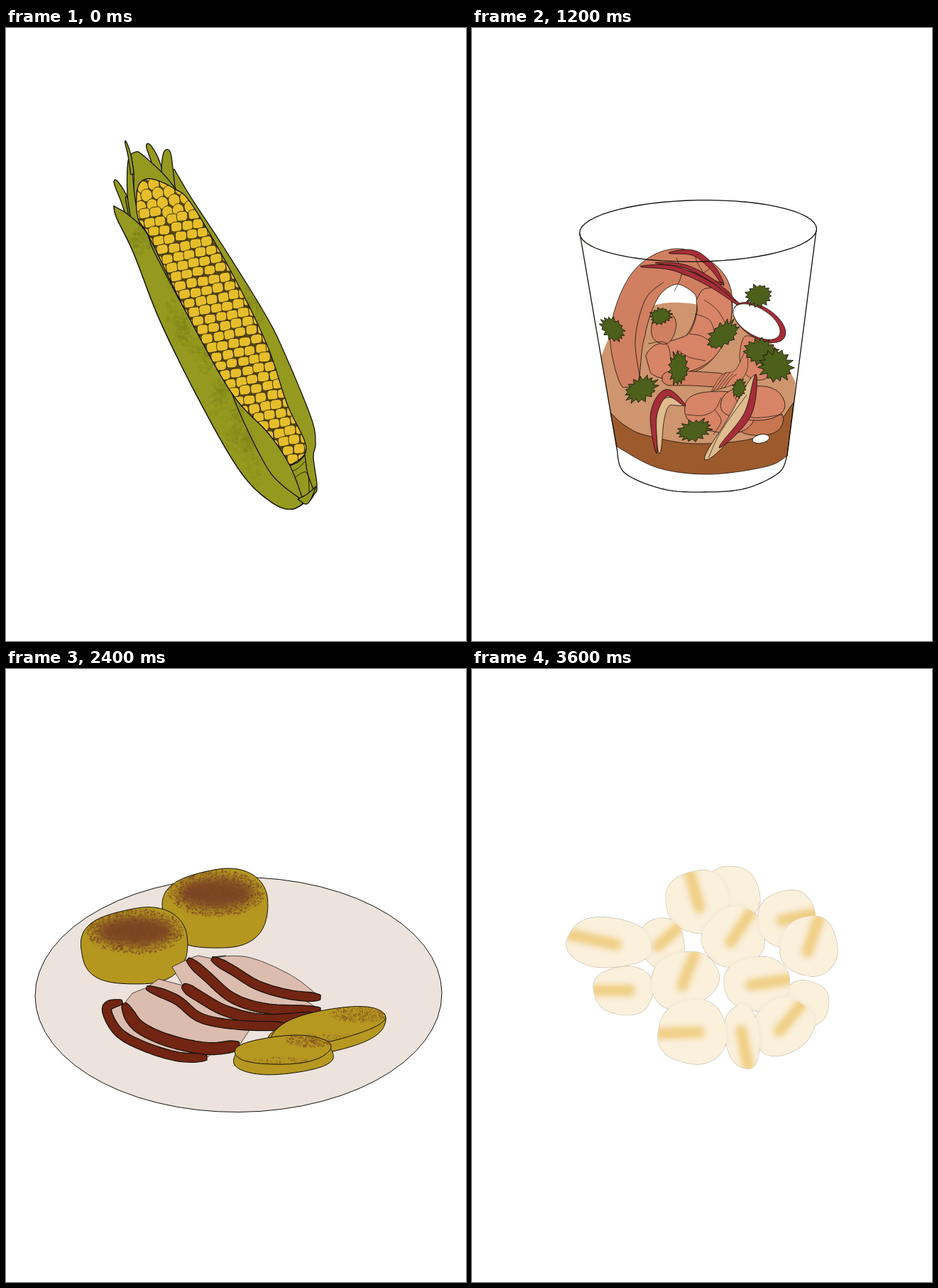
An HTML page with a canvas that plays this animation: 648 px wide and 864 px high, repeating every 4800 ms.

```html
<!DOCTYPE html>
<html lang="en">
<head>
<meta charset="utf-8">
<title>Food drawings</title>
<style>
html, body { margin: 0; width: 100%; height: 100%; overflow: hidden; background: #fff; }
canvas { display: block; width: 648px; height: 864px; }
</style>
</head>
<body>
<canvas id="stage" width="648" height="864"></canvas>
<script>
const ctx = document.getElementById('stage').getContext('2d');
const INK = '#12100a', TAU = Math.PI * 2;
let seed = 1;

function rnd() {
  seed = (seed * 16807) % 2147483647;
  return seed / 2147483647;
}

// key points "x,y"; a trailing "!" marks a sharp corner
function parse(text) {
  const pts = [];
  for (const item of text.trim().split(/\s+/)) {
    const p = item.replace('!', '').split(',').map(Number);
    pts.push(p);
    if (item.endsWith('!')) pts.push(p);
  }
  return pts;
}

// Catmull-Rom samples through the key points
function spline(text, open = true) {
  const p = parse(text), n = p.length, out = [];
  const at = i => open ? p[Math.max(0, Math.min(n - 1, i))] : p[(i + n) % n];
  const mix = (a, b, c, d, t) => 0.5 * (2 * b + (c - a) * t +
    (2 * a - 5 * b + 4 * c - d) * t * t + (3 * b - a - 3 * c + d) * t ** 3);
  for (let i = 0; i < (open ? n - 1 : n); i++) {
    const [a, b, c, d] = [at(i - 1), at(i), at(i + 1), at(i + 2)];
    if (b === c) continue;
    for (let t = 0; t < 1; t += 1 / 12) out.push([0, 1].map(k => mix(a[k], b[k], c[k], d[k], t)));
  }
  if (open) out.push(p[n - 1]);
  return out;
}

function trace(pts, open) {
  const path = new Path2D();
  pts.forEach(p => path.lineTo(...p));
  if (!open) path.closePath();
  return path;
}

function paint(path, fill, width = 1, ink = INK) {
  if (fill) { ctx.fillStyle = fill; ctx.fill(path); }
  if (width) { ctx.strokeStyle = ink; ctx.lineWidth = width; ctx.stroke(path); }
  return path;
}

const blob = (text, fill, width) => paint(trace(spline(text, false)), fill, width);
const line = (text, width = 1, ink) => paint(trace(spline(text), true), null, width, ink);

// band of varying width along a spline
function band(text, width) {
  const mid = spline(text), last = mid.length - 1, left = [], right = [];
  mid.forEach(([x, y], i) => {
    const a = mid[Math.max(0, i - 1)], b = mid[Math.min(last, i + 1)];
    const dx = b[0] - a[0], dy = b[1] - a[1], k = width(i / last) / 2 / (Math.hypot(dx, dy) || 1);
    left.push([x - dy * k, y + dx * k]);
    right.unshift([x + dy * k, y - dx * k]);
  });
  return trace(left.concat(right));
}

const taper = w => t => w * Math.sin(Math.PI * t) ** 0.6;
const stub = w => t => w * Math.sqrt(Math.min(1, 0.15 + 6 * t, 0.25 + 8 * (1 - t)));
const blade = w => t => w * Math.sqrt(1 - t) * (0.75 + 0.5 * t);

// slightly uneven rounded shape; power above 2 makes it squarer
function lump(x, y, rx, ry, turn = 0, power = 2.3, uneven = 0.025) {
  const phase = rnd() * TAU, pts = [];
  for (let a = 0; a < TAU; a += TAU / 60) {
    const c = Math.cos(a), s = Math.sin(a);
    const r = (Math.abs(c) ** power + Math.abs(s) ** power) ** (-1 / power) *
      (1 + uneven * Math.sin(3 * a + phase) + uneven * 0.5 * Math.sin(5 * a - phase));
    const u = c * r * rx, v = s * r * ry;
    pts.push([x + u * Math.cos(turn) - v * Math.sin(turn), y + u * Math.sin(turn) + v * Math.cos(turn)]);
  }
  return trace(pts);
}

const oval = (x, y, rx, ry, turn, fill, width) => paint(lump(x, y, rx, ry, turn, 2, 0), fill, width);

function inside(path, draw) {
  ctx.save();
  ctx.clip(path);
  draw();
  ctx.restore();
}

function speckle(x, y, rx, ry, color, count, size, alpha) {
  ctx.save();
  ctx.fillStyle = color;
  ctx.globalAlpha = alpha;
  for (let i = 0; i < count; i++) {
    const a = rnd() * TAU, r = rnd() ** 0.6;
    ctx.beginPath();
    ctx.arc(x + Math.cos(a) * r * rx, y + Math.sin(a) * r * ry, size * (0.4 + rnd()), 0, 7);
    ctx.fill();
  }
  ctx.restore();
}

function kernels() {
  for (let row = -1; row < 33; row++) {
    for (let col = -6; col < 10; col++) {
      const x = 207 + row * 6.3 + col * 15.6 + rnd() * 2, y = 217 + row * 12.6 - col * 3.1 + rnd() * 2;
      const w = 15 + rnd() * 1.4, h = 12.7 + rnd() * 1.4, cell = new Path2D();
      ctx.save();
      ctx.translate(x, y);
      ctx.rotate(-0.2 + rnd() * 0.2);
      if (y < 258) cell.ellipse(0, 3, 8.2, 9, 0, 0, 7);
      else cell.roundRect(-w / 2, -h / 2, w, h, [5, 4.5, 5.5, 4]);
      paint(cell, '#e6be2b', 0.9, '#39300e');
      ctx.restore();
    }
  }
}

function corn() {
  const green = '#95991f', shade = '#797e19', w = 1.3;
  const leaf = (text, width) => paint(band(text, blade(width)), green, w);
  const rim = ' 433,658 404,678 372,667 330,625 276,532 218,415 180,318 156,268';
  leaf('217,207 208,182 199,163', 15);
  const husk = blob('152,251! 185,277! 184,225 237,199! 262,241 306,308 366,405 394,462 430,550 436,585 433,605 438,645' + rim, green, w);
  inside(husk, () => speckle(350, 388, 14, 45, shade, 230, 1.8, 0.25));
  leaf('230,228 227,196 227,171', 22);
  blob('176,178! 182,175 190,177 220,204 240,228! 222,240 184,250 180,205', green, w);
  leaf('176,268 166,240 153,214', 15);
  leaf('176,268 173,252 169,238', 7);
  leaf('183,277 176,235 174,183', 14);
  leaf('178,206 174,180 168,159', 6);

  const cob = blob('184,235 190,217 207,213 238,227 262,249 318,345 367,445 396,530 423,592 400,617! 370,572 318,515 256,405 203,297 186,268', '#554512', 0);
  inside(cob, kernels);
  paint(cob, null, w);

  blob('399,617! 411,612 421,602! 425,628 433,650! 418,663', green, w);
  line('403,625 412,620 421,611');
  line('407,634 415,628 422,626 426,633 427,655');
  const flap = blob('152,251! 172,263 197,287 210,318 256,405 318,515 370,572 400,617 418,664! 424,670' + rim, green, 0);
  inside(flap, () => {
    for (let i = 0; i < 26; i++) {
      const t = rnd(), y = 290 + t * 340;
      speckle(176 + t * 165 + rnd() * 28, y, 8 + rnd() * 8, 12 + rnd() * 14, shade, 50, 2, 0.24 - t * 0.12);
    }
  });
  paint(flap, null, w);
  line('318,515 338,562 368,620 390,645 424,670', w);
  blob('411,664! 424,657 437,646! 429,665 422,671', green, w);
}

function herb(x, y, rx, ry, turn) {
  const pts = [], teeth = 15;
  for (let i = 0; i < teeth * 2; i++) {
    const a = i / teeth * Math.PI, r = i % 2 ? 0.66 + rnd() * 0.16 : 0.88 + rnd() * 0.24;
    const u = Math.cos(a) * rx * r, v = Math.sin(a) * ry * r;
    pts.push([x + u * Math.cos(turn) - v * Math.sin(turn), y + u * Math.sin(turn) + v * Math.cos(turn)]);
  }
  paint(trace(pts), '#4c5f1b', 0.8);
}

function glass() {
  const prawn = '#d17f61', pale = '#d78467', red = '#a52e38', cream = '#dfbb8e', fine = 0.8;
  const strip = (text, w, fill, shape = taper) => paint(band(text, shape(w)), fill, fine);
  blob('182,462! 205,420 260,390 320,390 376,409 428,451 456,500! 444,575 400,592 250,592 195,542!', '#ce956e', 0);
  blob('195,542! 215,560 245,574 318,586 410,574 453,528! 444,603! 415,618 335,629 262,620 204,590!', '#9d5a2d', fine);

  // large curled prawn with its joints
  strip('222,506 219,430 245,361 290,336 335,362 340,408 315,455 258,476', 50, prawn, stub);
  strip('337,366 341,405 318,452 248,474', 49, pale, stub);
  line('238,500 230,440 244,383 270,358', fine);
  oval(306, 384, 8, 3, -0.2, '#fff', 0);
  paint(lump(270, 423, 17, 22, 0.2), prawn, fine);
  for (const joint of ['248,445 275,446 283,494', '291,455 306,464 329,469', '306,431 325,435 346,450',
    '314,403 335,412 343,435', '327,383 346,398 361,424', '288,324 295,347 285,371', '314,316 318,332 338,363',
    '295,347 316,350 337,338']) line(joint, 0.7);
  strip('268,494 310,494 356,497', 20, prawn, stub);
  blob('386,434 377,462 384,486 401,496 417,489 415,450', pale, 0.7);
  blob('337,512! 352,489 371,482 385,457 388,480 374,500', pale, 0.6);
  for (let i = 0; i < 4; i++) line(`${340 + i * 5},${511 - i} ${350 + i * 5},${497 - i} ${358 + i * 5},${485 + i}`, 0.7);

  // smaller prawn
  paint(lump(406, 555, 33, 19, -0.1), '#c77650', fine);
  paint(lump(350, 541, 50, 29, 0.1), pale, fine);
  paint(lump(396, 529, 45, 24, 0), pale, fine);
  line('302,545 325,546 342,538 351,521', 0.7);
  line('370,520 391,548 437,545', 0.7);
  line('342,538 351,554 340,573', 0.7);

  // onion
  strip('277,317 312,317 338,337 355,363', 8, red);
  strip('355,361 333,356 303,342', 5, red);
  strip('237,336 285,339 340,364 394,404', 7, red);
  strip('258,331 300,336 340,357 372,385', 5, red);
  oval(405, 415, 41, 22, 0.55, red, fine);
  oval(401, 414, 37, 19, 0.55, '#fff', fine);
  strip('264,600 265,550 275,527 298,531', 13, cream);
  strip('260,600 256,545 274,514 301,533', 10, red);
  strip('328,609 367,558 400,488', 19, cream);
  strip('348,592 388,545 400,488', 10, red);
  line('333,606 351,568 387,517', 0.7);
  oval(407, 579, 12, 6, -0.2, '#fff');

  herb(198, 424, 21, 14, 0.8);
  herb(266, 406, 16, 12, -0.2);
  herb(238, 509, 25, 17, -0.5);
  herb(291, 480, 14, 25, 0);
  herb(353, 433, 27, 16, -0.7);
  herb(376, 508, 10, 14, 0.2);
  herb(404, 377, 20, 16, -0.3);
  herb(407, 457, 25, 20, 0.2);
  herb(428, 476, 25, 23, 0.5);
  herb(313, 567, 26, 15, -0.3);

  oval(318.5, 286, 167, 43.3, -0.018, null, 1.3);
  line('152,290! 204,593! 215,627 270,650 328,654 385,649 432,627 444,602! 485,285', 1.3);
}

function potato(x, y, rx, ry, turn) {
  const path = paint(lump(x, y, rx, ry, turn, 2.5), '#b59720', 0), top = y - ry * 0.4;
  inside(path, () => {
    ctx.save();
    ctx.filter = 'blur(7px)';
    oval(x, top, rx * 0.72, ry * 0.38, 0, '#7b4524', 0);
    ctx.restore();
    speckle(x, top, rx * 0.92, ry * 0.6, '#7b4524', 1900, 1, 0.5);
    speckle(x, top, rx * 0.7, ry * 0.4, '#92591f', 350, 0.7, 0.4);
  });
  paint(path);
}

function flatPotato(x, y, rx, ry, turn) {
  const gold = '#b69821', brown = '#7f4d1e';
  paint(lump(x, y + 4, rx, ry, turn), gold);
  const face = paint(lump(x + 1, y - 5, rx * 0.97, ry * 0.8, turn, 2.1), gold);
  inside(face, () => {
    speckle(x + rx * 0.55, y - ry * 0.75, rx * 0.5, ry * 0.4, brown, 450, 0.9, 0.45);
    speckle(x, y + ry * 0.5, rx * 0.85, ry * 0.3, brown, 300, 0.8, 0.4);
  });
}

function roast() {
  oval(327.5, 459, 286.5, 165.5, -0.008, '#ece3dc');
  potato(296, 338, 74, 55, -0.1);
  potato(182, 391, 75, 53, -0.1);

  // rind line, thickness and crest of the meat behind it
  const slices = [
    ['290,408 320,425 355,446 400,459 443,463', 13, [310, 404]],
    ['256,409 283,433 320,464 370,479 443,481', 14, [270, 404]],
    ['249,446 270,460 310,482 365,494 443,489', 15, [234, 420]],
    ['198,449 240,466 275,492 330,502 395,503', 13, [215, 437]],
    ['166,472 186,503 230,524 285,535 329,530', 17, [178, 457]],
    ['164,469 142,478 157,510 190,530 240,546 283,548', 13, [160, 467]]
  ];
  let back = spline('290,406 340,406 395,428 440,458');
  for (const [rind, , crest] of slices) {
    const front = spline(rind);
    const rear = back.slice(0, Math.ceil(back.length * 0.8)).reverse();
    paint(trace([...front, ...rear, crest]), '#dcbcae', 0.7);
    back = front;
  }
  for (const [rind, thick] of slices) {
    const path = paint(band(rind, stub(thick)), '#712512', 1.2);
    inside(path, () => speckle(290, 480, 160, 80, '#8a351d', 900, 0.9, 0.22));
  }
  flatPotato(452, 508, 84, 28, -0.2);
  flatPotato(390, 542, 70, 25, -0.06);
}

// centre, radii, turn, angle in degrees at which the yellow germ meets the rim
const grains = [
  [365, 318, 40, 39, 0], [318, 328, 44, 44, 0, -106], [369, 378, 44, 41, -0.5, -58],
  [444, 353, 40, 41, 0, -12], [475, 391, 40, 42, 0, -70], [267, 386, 32, 35, -0.4, -40],
  [214, 453, 42, 34, 0, 180], [192, 386, 59, 35, 0.05, 200], [299, 439, 48, 39, -0.4, -72],
  [470, 472, 32, 33, 0], [402, 444, 46, 38, 0, -10], [438, 504, 44, 38, -0.6, -54],
  [381, 518, 24, 45, -0.12, 70], [311, 512, 48, 45, 0, 178]
];

function hominy() {
  const cream = '#faf0dc', shapes = grains.map(g => lump(...g.slice(0, 5), 2.2, 0.03));
  shapes.forEach(s => paint(s, null, 1.4, '#c4bba8'));
  shapes.forEach(s => paint(s, cream, 0));
  grains.forEach(([x, y, rx, ry, , angle], i) => {
    ctx.save();
    ctx.globalCompositeOperation = 'source-atop';
    ctx.shadowColor = 'rgba(170,155,125,.16)';
    ctx.shadowBlur = 6;
    paint(shapes[i], cream, 0);
    ctx.restore();
    if (angle === undefined) return;
    const a = angle * Math.PI / 180, dx = Math.cos(a) * rx, dy = Math.sin(a) * ry;
    const germ = `${x + dx},${y + dy} ${x - dx * 0.2},${y - dy * 0.2}`;
    inside(shapes[i], () => {
      ctx.lineCap = 'round';
      ctx.filter = 'blur(4px)';
      line(germ, 16, '#f3d799');
      line(germ, 8, '#efcb7e');
    });
  });
}

const scenes = [corn, glass, roast, hominy];
const HOLD = 1200;
let shown = -1, start = null;

function tick(now) {
  if (start === null) start = now;
  const index = Math.floor((now - start) / HOLD) % scenes.length;
  if (index !== shown) {
    shown = index;
    seed = 4711;
    ctx.clearRect(0, 0, 648, 864);
    ctx.lineJoin = 'round';
    scenes[index]();
  }
  requestAnimationFrame(tick);
}
requestAnimationFrame(tick);
</script>
</body>
</html>
```
